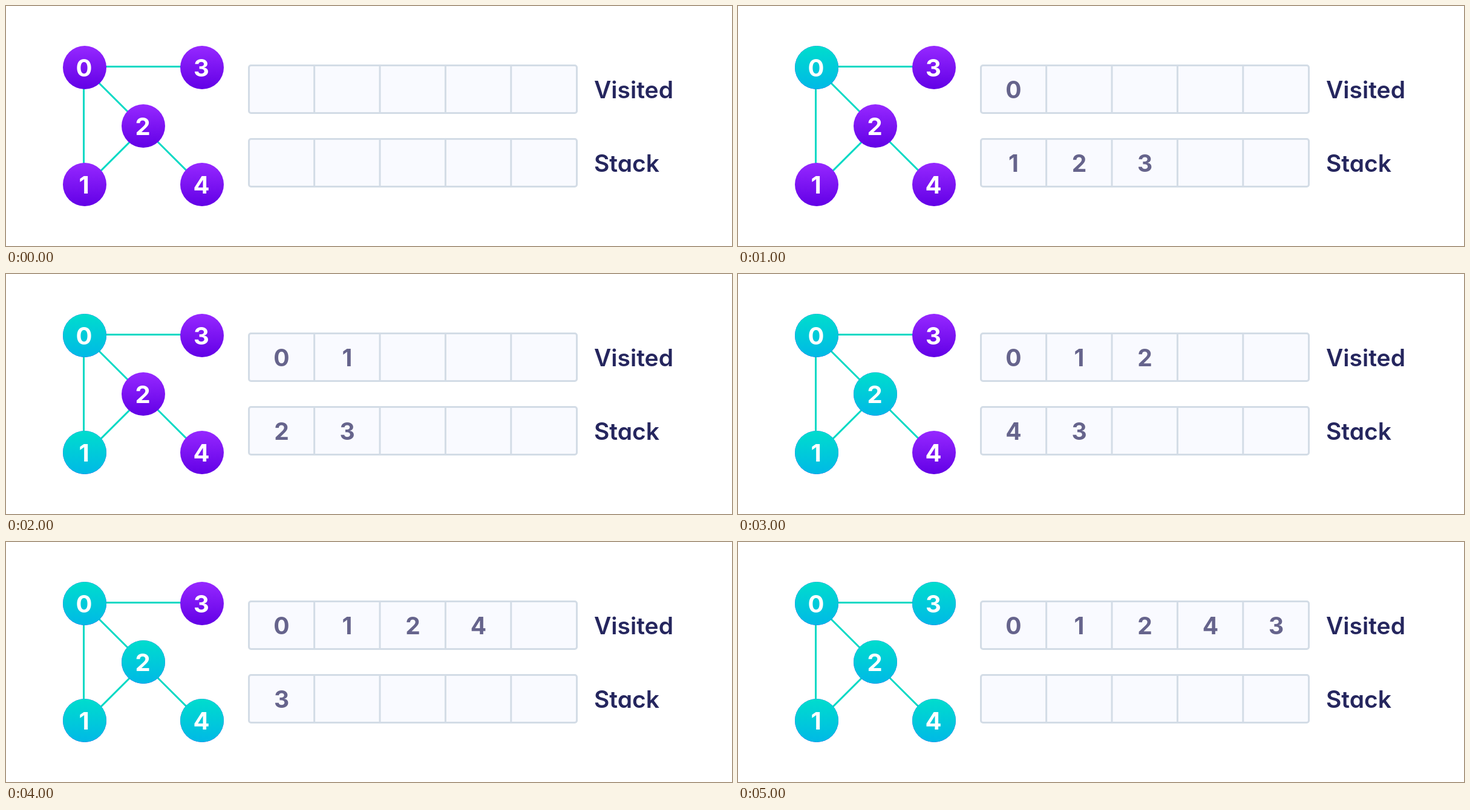
Animation of 1200x398 px, one loop 6 s. Source, as an HTML page:

```html
<!DOCTYPE html>
<html lang="en">
<head>
<meta charset="utf-8">
<title>Depth-first search</title>
<style>
  html, body { margin: 0; width: 100%; height: 100%; overflow: hidden; background: #fff; }
  svg { display: block; width: 1200px; height: 398px; }
  text { font-family: Inter, "Open Sans", sans-serif; font-feature-settings: "cv11"; }
  .label { font-size: 39px; font-weight: 600; fill: #25265e; }
  .digit { font-size: 40px; font-weight: 700; text-anchor: middle; }
  .node .digit { fill: #fff; }
  .cell { fill: #66648c; font-size: 39px; }
  .edges { stroke: #00d9c4; stroke-width: 3; fill: none; }
  .grid { fill: #f9faff; stroke: #d3dce6; stroke-width: 3; }

  .visit, .slot { opacity: 0; animation: 6s step-end infinite; }
  .slot { animation-name: slot; }
  @keyframes slot { from { opacity: 1 } 16.666%, to { opacity: 0 } }
  @keyframes visit1 { from { opacity: 0 } 16.666%, to { opacity: 1 } }
  @keyframes visit2 { from { opacity: 0 } 33.333%, to { opacity: 1 } }
  @keyframes visit3 { from { opacity: 0 } 50%, to { opacity: 1 } }
  @keyframes visit4 { from { opacity: 0 } 66.666%, to { opacity: 1 } }
  @keyframes visit5 { from { opacity: 0 } 83.333%, to { opacity: 1 } }
</style>
</head>
<body>
<svg id="stage" viewBox="0 0 1200 398">
  <defs>
    <linearGradient id="purple" x2="0" y2="1">
      <stop stop-color="#9628ff"/><stop offset="1" stop-color="#6200e6"/>
    </linearGradient>
    <linearGradient id="cyan" x2="0" y2="1">
      <stop stop-color="#00ddcd"/><stop offset="1" stop-color="#00b9e6"/>
    </linearGradient>
  </defs>
  <path class="edges" d="M130 100.5H324M128.5 102V296M128 102L227 201M227 203L133 297M227 201.5L324 298.5"/>
  <text class="label" x="972" y="153">Visited</text>
  <text class="label" x="972" y="275">Stack</text>
</svg>
<script>
  const stage = document.getElementById('stage');
  const nodes = [[130, 102], [130, 296], [227, 199], [324, 102], [324, 296]];
  const order = [0, 1, 2, 4, 3];
  const stacks = [[], [1, 2, 3], [2, 3], [4, 3], [3], []];
  const rows = { visited: 98.5, stack: 220.5 };

  function add(parent, tag, attrs, text = '') {
    const el = document.createElementNS('http://www.w3.org/2000/svg', tag);
    for (const key in attrs) el.setAttribute(key, attrs[key]);
    el.textContent = text;
    return parent.appendChild(el);
  }

  function cellDigit(parent, column, top, value) {
    const x = 455.5 + 108.5 * column;
    return add(parent, 'text', { class: 'digit cell', x, y: top + 54.5 }, value);
  }

  for (const top of Object.values(rows)) {
    add(stage, 'rect', { class: 'grid', x: 401.5, y: top, width: 542, height: 79, rx: 3.5 });
    for (let i = 1; i < 5; i++) {
      add(stage, 'path', { class: 'grid', d: `M${401.2 + 108.4 * i} ${top}v79` });
    }
  }

  nodes.forEach(([cx, cy], id) => {
    const node = add(stage, 'g', { class: 'node' });
    const step = order.indexOf(id) + 1;
    add(node, 'circle', { cx, cy, r: 36, fill: 'url(#purple)' });
    add(node, 'circle', {
      cx, cy, r: 36, fill: 'url(#cyan)', class: 'visit', style: `animation-name: visit${step}`
    });
    add(node, 'text', { class: 'digit', x: cx - 1, y: cy + 15 }, id);
  });

  order.forEach((id, i) => {
    const group = add(stage, 'g', { class: 'visit', style: `animation-name: visit${i + 1}` });
    cellDigit(group, i, rows.visited, id);
  });

  // Negative delays give each stack state its own second of the loop.
  stacks.forEach((items, step) => {
    const group = add(stage, 'g', { class: 'slot', style: `animation-delay: ${step - 6}s` });
    items.forEach((id, i) => cellDigit(group, i, rows.stack, id));
  });
</script>
</body>
</html>
```
